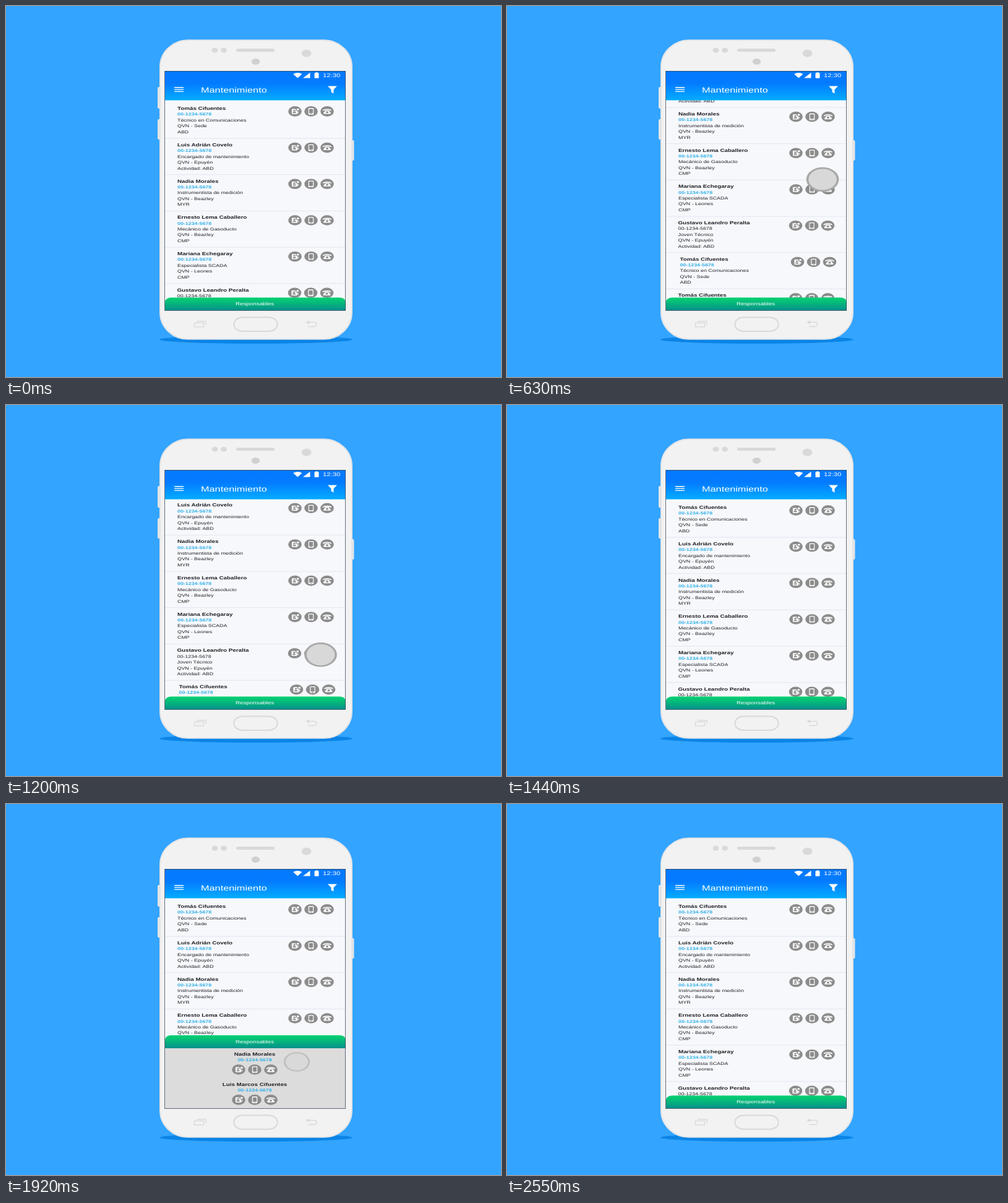
Animation, 800 px wide and 600 px high, one loop 2.97 s. Source, as an HTML page with a canvas:

```html
<!DOCTYPE html>
<html lang="es">
<head>
<meta charset="utf-8">
<title>Mantenimiento</title>
<style>
  html, body { margin: 0; width: 100%; height: 100%; overflow: hidden; background: #33a4ff; }
  canvas { display: block; width: 800px; height: 600px; }
</style>
</head>
<body>
<canvas id="stage" width="800" height="600"></canvas>
<script>
const ctx = document.getElementById('stage').getContext('2d');
const LOOP = 2970, STEP = 30;
const WIDE = 4 / 3; // the whole scene uses wide pixels
const EM = 64; // text is set large and scaled down to keep exact spacing
const SCREEN = { x: 257, y: 105, w: 292, h: 387.5 };
const ROW = 58.7, SCROLL = 120.5, DRAWER = 97.5;
const PHONE = '00-1234-5678', CYAN = '#2fb0ea', GREY = '#8c8c8c', INK = '#1f1f24';

const people = [
  { name: 'Tomás Cifuentes', lines: ['Técnico en Comunicaciones', 'QVN - Sede', 'ABD'] },
  { name: 'Luis Adrián Covelo', lines: ['Encargado de mantenimiento', 'QVN - Epuyén', 'Actividad: ABD'] },
  { name: 'Nadia Morales', lines: ['Instrumentista de medición', 'QVN - Beazley', 'MYR'] },
  { name: 'Ernesto Lema Caballero', lines: ['Mecánico de Gasoducto', 'QVN - Beazley', 'CMP'] },
  { name: 'Mariana Echegaray', lines: ['Especialista SCADA', 'QVN - Leones', 'CMP'] },
  { name: 'Gustavo Leandro Peralta', lines: ['Joven Técnico', 'QVN - Epuyén', 'Actividad: ABD'], plain: true, dx: -0.5 },
];
people.push({ ...people[0], dx: 2.5 }, { ...people[0], dx: -0.5 });

const touches = [
  { show: 330, start: 367, end: 750, hide: 655, from: [508, 450], to: [510.3, 262] },
  { show: 930, start: 1089, end: 1309, hide: 1310, from: [510.3, 262], to: [508, 450] },
  { show: 1440, start: 1530, end: 1880, hide: 1880, from: [470, 479], to: [470, 417] },
  { show: 1950, start: 2070, end: 2370, hide: 2370, from: [470, 417], to: [470, 479] },
];

const ramp = (t, a, b) => Math.min(1, Math.max(0, (t - a) / (b - a)));
const glide = (t, a, b) => 1 - (1 - ramp(t, a, b)) ** 2;
const mix = (a, b, k) => a + (b - a) * k;

function at(x, y, draw) {
  ctx.save();
  ctx.translate(x, y);
  ctx.scale(WIDE, 1);
  draw();
  ctx.restore();
}

function text(str, x, y, size, color, weight = 400, align = 'left') {
  at(x, y, () => {
    ctx.scale(size / EM, size / EM);
    ctx.font = `${weight} ${EM}px "Liberation Sans", Arial, sans-serif`;
    ctx.textRendering = 'geometricPrecision';
    ctx.textAlign = align;
    ctx.fillStyle = color;
    ctx.fillText(str, 0, EM * 0.355);
  });
}

function box(x, y, w, h, r, fill) {
  ctx.beginPath();
  ctx.roundRect(x, y, w, h, r);
  ctx.fillStyle = fill;
  ctx.fill();
}

function oval(x, y, rx, ry, fill) {
  ctx.beginPath();
  ctx.ellipse(x, y, rx, ry, 0, 0, 7);
  ctx.fillStyle = fill;
  ctx.fill();
}

function poly(points, fill) {
  ctx.beginPath();
  points.forEach(([x, y]) => ctx.lineTo(x, y));
  ctx.closePath();
  ctx.fillStyle = fill;
  ctx.fill();
}

function fade(y, h, stops) {
  const g = ctx.createLinearGradient(0, y, 0, y + h);
  stops.forEach(([pos, color]) => g.addColorStop(pos, color));
  return g;
}

function cardGlyph() {
  box(-3.8, -3.9, 6.8, 8.2, 0.8, '#fff');
  oval(-0.7, -1.2, 1.3, 1.3, GREY);
  box(-2.7, 0.7, 4, 2.1, 1, GREY);
  oval(3.3, -3.1, 2.4, 2.4, GREY);
  oval(3.5, -3.1, 1.5, 1.5, '#fff');
  box(3.4, 0, 0.9, 3, 0, '#fff');
}

function mobileGlyph() {
  box(-3.2, -5.3, 6.4, 10.6, 1, '#fff');
  box(-2.3, -4, 4.6, 7.2, 0, GREY);
  oval(0, 4.2, 0.6, 0.6, GREY);
}

function landlineGlyph() {
  ctx.beginPath();
  ctx.moveTo(-4.7, -1.2);
  ctx.quadraticCurveTo(-4.4, -3, 0, -3);
  ctx.quadraticCurveTo(4.4, -3, 4.7, -1.2);
  ctx.strokeStyle = '#fff';
  ctx.lineWidth = 1.8;
  ctx.stroke();
  poly([[-2, -1.4], [2, -1.4], [4.3, 2.2], [4.3, 4], [-4.3, 4], [-4.3, 2.2]], '#fff');
  oval(0, 1.3, 1.5, 1.5, GREY);
}

function actions(x, y) {
  [cardGlyph, mobileGlyph, landlineGlyph].forEach((glyph, i) => at(x + i * 26, y, () => {
    oval(0, 0, 8.1, 8.3, GREY);
    glyph();
  }));
}

function drawBody() {
  ctx.fillStyle = '#33a4ff';
  ctx.fillRect(0, 0, 800, 600);
  oval(404, 539.5, 156, 6.5, '#0a84e6');
  box(245, 131, 6, 35, 2, '#e3e5e7');
  box(245, 183, 6, 33, 2, '#e3e5e7');
  box(556, 217, 6.5, 33, 2, '#e3e5e7');

  box(249, 55.3, 310, 483.5, { x: 45, y: 43 }, '#f2f2f2');
  ctx.lineWidth = 2;
  ctx.strokeStyle = '#e2e4e6';
  ctx.stroke();

  const detail = '#d9d9d9';
  oval(337.5, 71.5, 5, 4, detail);
  oval(352, 71.5, 5, 4, detail);
  box(372, 69, 62, 5, 2.5, detail);
  oval(485.5, 76.5, 8, 6, detail);
  oval(403.5, 90, 6.7, 5, '#d0d0d0');

  ctx.strokeStyle = detail;
  ctx.lineWidth = 2;
  ctx.beginPath();
  ctx.roundRect(368.5, 503.5, 70, 22.5, { x: 14, y: 10.5 });
  ctx.stroke();
  ctx.lineWidth = 1.3;
  ctx.strokeRect(304.5, 512.5, 15, 6.5);
  ctx.beginPath();
  ctx.moveTo(308, 510);
  ctx.lineTo(323, 510);
  ctx.lineTo(323, 516);
  ctx.moveTo(489, 511.5);
  ctx.lineTo(498, 511.5);
  ctx.bezierCurveTo(503, 511.5, 503, 518.5, 498, 518.5);
  ctx.lineTo(488, 518.5);
  ctx.stroke();
  poly([[484, 511.5], [490, 508.8], [490, 514.2]], detail);
}

function drawList(scroll) {
  ctx.fillStyle = '#f7f8fb';
  ctx.fillRect(SCREEN.x, SCREEN.y, SCREEN.w, SCREEN.h);
  people.forEach((p, i) => {
    const y = 165.5 + i * ROW - scroll;
    const x = 277 + (p.dx || 0);
    text(p.name, x, y, 7.35, INK, 700);
    text(PHONE, x, y + 9.6, 6.65, p.plain ? INK : CYAN, p.plain ? 400 : 700);
    p.lines.forEach((line, n) => text(line, x, y + 19 + n * 9.5, 6.65, INK));
    actions(x + 190, y + 4.9);
    ctx.fillStyle = '#e1e6f3';
    ctx.fillRect(SCREEN.x, y + 48, SCREEN.w, 1);
  });
}

function drawHeader() {
  ctx.fillStyle = fade(105, 47.5, [[0, '#0579ff'], [0.42, '#047bff'], [1, '#04acff']]);
  ctx.fillRect(SCREEN.x, 105, SCREEN.w, 47.5);

  at(471.3, 116.5, () => {
    ctx.beginPath();
    ctx.moveTo(0, 0);
    ctx.lineTo(-5.4, -6.6);
    ctx.quadraticCurveTo(0, -10.4, 5.4, -6.6);
    ctx.closePath();
    ctx.fillStyle = '#fff';
    ctx.fill();
  });
  poly([[480, 116.5], [491.5, 116.5], [491.5, 107.8]], '#fff');
  box(498.5, 108.2, 7, 8.6, 0.8, '#fff');
  box(500.5, 107.2, 3, 2, 0, '#fff');
  text('12:30', 512, 112, 8.5, '#fff');

  [131.7, 135, 138.3].forEach(y => box(272, y - 0.6, 15, 1.3, 0, '#fff'));
  text('Mantenimiento', 315, 135.7, 12.2, '#fff');
  poly([[520, 129.5], [535, 129.5], [529.5, 135.2], [529.5, 141.5], [525.5, 139.2], [525.5, 135.2]], '#fff');
}

function drawDrawer(open) {
  const y = 471.5 - DRAWER * open;
  ctx.fillStyle = '#dcdcdc';
  ctx.fillRect(SCREEN.x, y + 19, SCREEN.w, 120);
  const green = fade(y, 21, [[0, '#05d272'], [0.35, '#06bd78'], [1, '#058f8c']]);
  box(SCREEN.x, y, SCREEN.w, 21, [{ x: 10, y: 7 }, { x: 10, y: 7 }, 0, 0], green);
  text('Responsables', 402, y + 10.3, 7.35, '#fff', 400, 'center');
  ['Nadia Morales', 'Luis Marcos Cifuentes'].forEach((name, i) => {
    const top = y + 30.2 + i * 48.9;
    text(name, 402, top, 7.35, INK, 700, 'center');
    text(PHONE, 402, top + 9.5, 6.65, CYAN, 700, 'center');
    actions(376, top + 25.3);
  });
}

function drawTouch(t, { show, start, end, hide, from, to }) {
  const out = ramp(t, hide, hide + 90);
  const alpha = ramp(t, show, show + 180) * (1 - out);
  if (!alpha) return;
  const k = glide(t, start, end);
  at(mix(from[0], to[0], k), mix(from[1], to[1], k), () => {
    const size = 1 - 0.45 * out;
    ctx.scale(size, size);
    ctx.globalAlpha = alpha;
    oval(0, 0, 18.4, 18.4, '#d8d8d8');
    ctx.lineWidth = 2.7;
    ctx.strokeStyle = '#a9a9a9';
    ctx.stroke();
  });
}

function render(t) {
  const scroll = SCROLL * (glide(t, 367, 750) - glide(t, 1120, 1405));
  const open = glide(t, 1545, 1890) - glide(t, 2085, 2430);

  drawBody();
  ctx.save();
  ctx.beginPath();
  ctx.rect(SCREEN.x, SCREEN.y, SCREEN.w, SCREEN.h);
  ctx.clip();
  drawList(scroll);
  drawHeader();
  drawDrawer(open);
  ctx.restore();

  ctx.strokeStyle = 'rgba(50, 65, 85, 0.75)';
  ctx.lineWidth = 1;
  ctx.strokeRect(SCREEN.x - 0.5, SCREEN.y + 0.5, SCREEN.w, SCREEN.h - 0.5);
  touches.forEach(touch => drawTouch(t, touch));
}

const began = performance.now();
function tick() {
  const t = (performance.now() - began) % LOOP;
  render(Math.floor(t / STEP) * STEP);
  requestAnimationFrame(tick);
}
tick();
</script>
</body>
</html>
```
